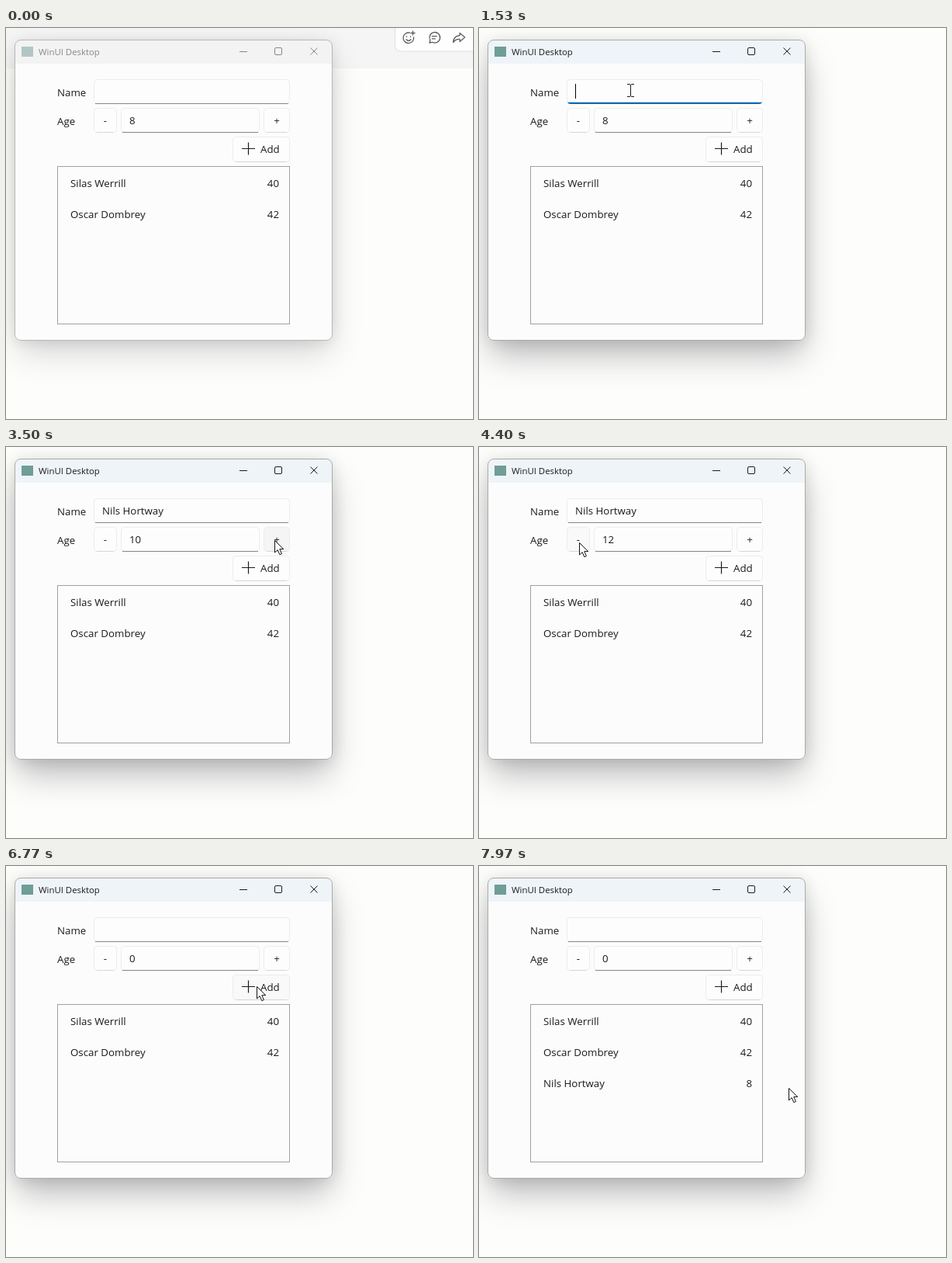
Recreate the animation shown at these times as an HTML page. Size 602 by 504 pixels, loop 8000 ms.

```html
<!DOCTYPE html>
<html lang="en">
<head>
<meta charset="utf-8">
<title>Desktop form</title>
<style>
  html, body { margin: 0; width: 100%; height: 100%; overflow: hidden; background: #fdfdfc; }
  #message { position: absolute; left: 0; top: 0; width: 602px; height: 52px; background: #f5f5f5; }
  #window {
    position: absolute; left: 11px; top: 15px; width: 408px; height: 386px;
    border: 1px solid #a9ada4; border-radius: 8px;
    background: linear-gradient(#eff4f9 30px, #fcfcfc 30px);
    box-shadow: 0 22px 44px -4px rgba(0, 0, 10, .27), 0 2px 20px rgba(0, 0, 10, .11);
  }
  #window.inactive {
    border-color: #b6bab0;
    background: linear-gradient(#f3f3f3 30px, #fcfcfc 30px);
    box-shadow: 0 18px 44px -4px rgba(0, 0, 10, .17), 0 2px 18px rgba(0, 0, 10, .09);
  }
  svg { position: absolute; left: 0; top: 0; display: block; }
  text { font: 13.3px "Open Sans", "Noto Sans", sans-serif; fill: #1b1b1b; white-space: pre; }
  .title { font-size: 11.4px; }
  .end { text-anchor: end; }
  .mid { text-anchor: middle; }
  .box { fill: #fdfdfd; stroke: #ececec; }
  .box.hover { fill: #f9f9f9; }
  .box.pressed { fill: #f5f5f5; }
  .line { fill: none; stroke: #1b1b1b; }
  .edge { stroke: #868686; }
  .soft { stroke: #d6d6d6; }
  #caption.inactive { opacity: .5; }
</style>
</head>
<body>
<div id="message"></div>
<div id="window"></div>
<svg width="602" height="504" viewBox="0 0 602 504">
  <g id="toolbar">
    <path d="M501.5 -1V22q0 8 8 8H603V-1Z" fill="#fefefe" stroke="#dedede"/>
    <g fill="none" stroke="#5c5c5c" stroke-width="1.3" stroke-linecap="round" stroke-linejoin="round">
      <path d="M520.5 6.2A6.8 6.8 0 1 0 525.6 12M516 14.8q3 3.4 6 0M516.5 11v.4M521.5 11v.4M524.5 4v5M522 6.5h5"/>
      <path d="M546 19l.8-3.4A6.8 6.8 0 1 1 549.5 18.3ZM549.3 10.6h6M549.3 13.8h4"/>
      <path d="M585 6.5L591.5 12L585 17.5V14.5Q580 14 576.5 18.5Q577 10.500 585 9.500Z"/>
    </g>
  </g>

  <g id="caption">
    <rect x="20" y="24" width="15" height="13" fill="#6f9d98"/>
    <text class="title" x="42" y="35">WinUI Desktop</text>
    <path class="line" d="M301 30.500h10M392.500 25.500l9 9M401.500 25.500l-9 9"/>
    <rect class="line" x="346.500" y="25.500" width="9" height="9" rx="1.500"/>
  </g>

  <text x="66" y="88">Name</text>
  <text x="66" y="125">Age</text>

  <rect class="box" x="113.500" y="66.500" width="252" height="31" rx="4"/>
  <path id="nameEdge" class="edge" d="M115 97.500H364"/>
  <path id="nameFocus" d="M114 95.800H365Q364 98 361 98H118Q115 98 114 95.800Z" fill="#0e68b0"/>
  <text id="name" x="124" y="87"></text>
  <path id="clear" d="M343.500 78.500l8 7.500M351.500 78.500l-8 7.500" stroke="#868686" fill="none"/>
  <path id="caret" d="M.5 72V91" stroke="#000"/>

  <rect id="minus" class="box" x="113.500" y="103.500" width="29" height="31" rx="4"/>
  <path class="soft" d="M117 134.500h22"/>
  <text class="mid" x="128" y="124">-</text>

  <rect class="box" x="148.500" y="103.500" width="178" height="31" rx="4"/>
  <path class="edge" d="M150 134.500H325"/>
  <text id="age" x="159" y="124"></text>

  <rect id="plus" class="box" x="332.500" y="103.500" width="33" height="31" rx="4"/>
  <path class="soft" d="M336 134.500h26"/>
  <text class="mid" x="349" y="124">+</text>

  <rect id="add" class="box" x="292.500" y="140.500" width="73" height="32" rx="4"/>
  <path class="soft" d="M296 172.500h66"/>
  <path class="line" d="M304 155.500h17M312.500 147.500v16" stroke-width="1.200"/>
  <text x="328" y="161">Add</text>

  <rect x="66.500" y="178.500" width="299" height="203" fill="none" stroke="#a0a0a0"/>
  <text x="83" y="205">Silas Werrill</text><text class="end" x="352" y="205">40</text>
  <text x="83" y="245">Oscar Dombrey</text><text class="end" x="352" y="245">42</text>
  <g id="newRow">
    <text x="83" y="285">Nils Hortway</text><text class="end" x="352" y="285">8</text>
  </g>

  <g id="pointer">
    <path id="arrow" d="M.5 .5V16L4.200 12.600L6.800 18.700L9.400 17.600L6.800 11.600H11.800Z" fill="#fff" stroke="#111"/>
    <path id="beam" class="line" d="M-4 -7.500H-1Q0 -7.500 .5 -6.500Q1 -7.500 2 -7.500H5M.5 -7V8M-4 8.500H-1Q0 8.500 .5 7.500Q1 8.500 2 8.500H5"/>
  </g>
</svg>
<script>
const LOOP = 8000;
const PERSON = "Nils Hortway";
const T = { leave: 820, focus: 1200, type: 1700, key: 70, blur: 3120, submit: 6560, row: 6830 };
const PLUS_CLICKS = [3120, 3320, 3520, 3720];
const MINUS_CLICKS = [4540, 4740, 4940, 5140];

// time, x, y of the pointer
const PATH = [
  [420, 606, 210], [1080, 195, 80], [1530, 195, 80], [2630, 195, 82], [2700, 195, 82],
  [3050, 346, 120], [3850, 346, 120], [4330, 129, 123], [5300, 129, 123],
  [5770, 273, 139], [6150, 323, 155], [7480, 323, 155], [7900, 399, 286], [8000, 399, 286]
];

const $ = id => document.getElementById(id);
const clamp = v => Math.max(0, Math.min(1, v));
const show = (id, on) => { $(id).style.display = on ? "" : "none"; };
const count = (times, t) => times.filter(c => t >= c).length;

function pointerAt(t) {
  const i = PATH.findIndex(p => p[0] > t);
  if (i < 1) return PATH[0].slice(1);
  const [t0, x0, y0] = PATH[i - 1], [t1, x1, y1] = PATH[i];
  const k = (t - t0) / (t1 - t0), e = k * k * (3 - 2 * k);
  return [x0 + (x1 - x0) * e, y0 + (y1 - y0) * e];
}

function hoverButton(id, x, y, clicks, t) {
  const b = $(id).getBBox();
  const over = x >= b.x && x <= b.x + b.width && y >= b.y && y <= b.y + b.height;
  $(id).classList.toggle("hover", over);
  $(id).classList.toggle("pressed", clicks.some(c => Math.abs(t - c) < 50));
}

function draw(t) {
  const active = t >= T.focus;
  const focused = active && t < T.blur;
  const submitted = t >= T.submit;
  const typed = Math.max(0, Math.min(PERSON.length, Math.floor((t - T.type) / T.key) + 1));
  const [x, y] = pointerAt(t);

  show("message", t < T.leave);
  show("toolbar", t < T.leave);
  $("window").classList.toggle("inactive", !active);
  $("caption").classList.toggle("inactive", !active);

  $("name").textContent = submitted ? "" : PERSON.slice(0, typed);
  $("age").textContent = submitted ? 0 : 8 + count(PLUS_CLICKS, t) - count(MINUS_CLICKS, t);

  show("nameEdge", !focused);
  show("nameFocus", focused);
  show("clear", focused && typed > 0);
  const lastKey = typed ? T.type + (typed - 1) * T.key : T.focus;
  show("caret", focused && (t - lastKey) % 1060 < 530);
  $("caret").setAttribute("transform", `translate(${124 + Math.round($("name").getComputedTextLength())})`);

  $("newRow").style.opacity = clamp((t - T.row) / 200);

  hoverButton("minus", x, y, MINUS_CLICKS, t);
  hoverButton("plus", x, y, PLUS_CLICKS, t);
  hoverButton("add", x, y, [T.submit], t);

  const inName = x > 113 && x < 366 && y > 66 && y < 98;
  const inAge = x > 148 && x < 327 && y > 103 && y < 135;
  show("pointer", t >= PATH[0][0]);
  show("beam", inName || inAge);
  show("arrow", !inName && !inAge);
  $("pointer").setAttribute("transform", `translate(${Math.round(x)} ${Math.round(y)})`);
}

const start = performance.now();
function frame() {
  draw((performance.now() - start) % LOOP);
  requestAnimationFrame(frame);
}
frame();
</script>
</body>
</html>
```
